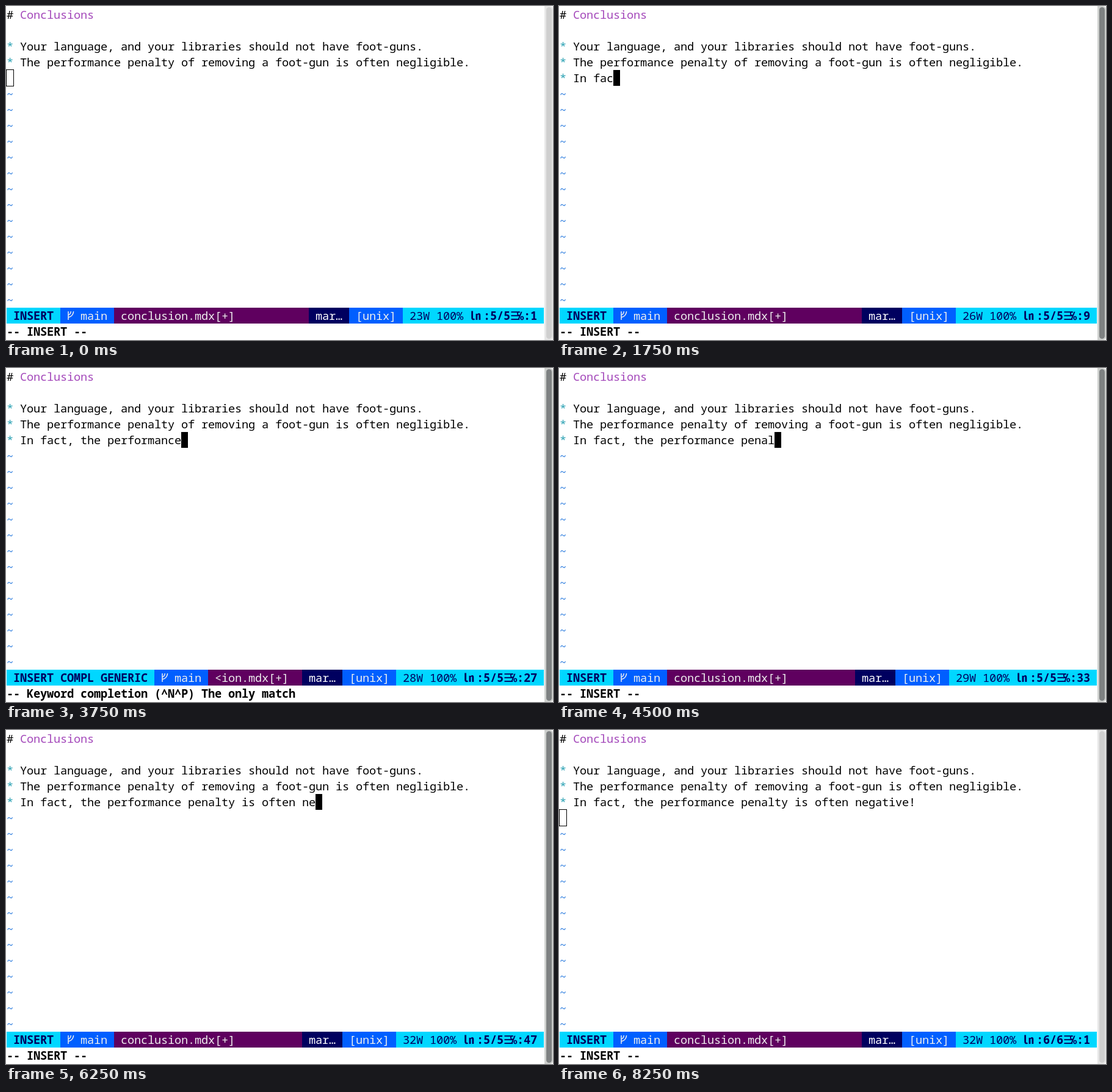
These frames come from a looping animation (896 px wide and 548 px high, 8.5 s). An HTML page:

```html
<!DOCTYPE html>
<html lang="en">
<head>
<meta charset="utf-8">
<title>Conclusions</title>
<style>
  html, body { margin: 0; width: 100%; height: 100%; overflow: hidden; background: #fff; }
  svg { display: block; width: 896px; height: 548px; }
  text {
    font: 18.667px 'Noto Sans Mono', 'DejaVu Sans', 'Noto Sans CJK JP', 'Noto Sans CJK SC', monospace;
    font-variant-ligatures: none;
    white-space: pre;
  }
  .bold { font-weight: 700; }
</style>
</head>
<body>
<svg viewBox="0 0 896 548"><g id="scrollbar"></g><g id="screen"></g></svg>
<script>
const CELL_W = 11, CELL_H = 26, ORIGIN = 1, BASELINE = 20, COLS = 80;
const STEP = 250, LOOP = 8500;
const EDIT_ROW = 4, STATUS_ROW = 19, MESSAGE_ROW = 20;
const CYAN = '#00d7ff', BLUE = '#005fff', NAVY = '#00005f', PLUM = '#5f005f', PALE = '#eeeeee';

const SENTENCE = '* In fact, the performance penalty is often negative!';
const COMPLETED = SENTENCE.indexOf(' penalty');
// Characters on the line after each step; past the end means Enter was pressed.
const ENTER = SENTENCE.length + 1;
const TYPED = [0, 0, 1, 2, 3, 4, 6, 8, 9, 11, 13, 15, 17, 18, 19, COMPLETED,
  28, 30, 32, 34, 36, 38, 40, 42, 44, 46, 48, 50, 51, 52, 53, ENTER, ENTER, ENTER];
const LATE_CURSOR_STEP = 10;

const screen = document.getElementById('screen');
const scrollbar = document.getElementById('scrollbar');
const cellX = col => ORIGIN + col * CELL_W;
const cellY = row => ORIGIN + row * CELL_H;

function add(parent, tag, attrs, content) {
  const node = document.createElementNS('http://www.w3.org/2000/svg', tag);
  for (const name in attrs) node.setAttribute(name, attrs[name]);
  if (content) node.textContent = content;
  parent.appendChild(node);
}

function put(col, row, string, fill = '#000', bold = false) {
  const x = [...string].map((_, i) => cellX(col + i)).join(' ');
  add(screen, 'text', { x, y: cellY(row) + BASELINE, fill, class: bold ? 'bold' : '' }, string);
}

function fillCells(col, row, count, fill) {
  add(screen, 'rect', { x: cellX(col), y: cellY(row), width: count * CELL_W, height: CELL_H, fill });
}

function segment(col, count, string, back, fore, bold) {
  fillCells(col, STATUS_ROW, count, back);
  put(col + 1, STATUS_ROW, string, fore, bold);
}

function drawBranch(col) {
  const x = cellX(col), y = cellY(STATUS_ROW);
  add(screen, 'path', {
    d: `M${x + 2} ${y + 6}v14M${x + 2} ${y + 12}q4 -1 4.3 -6M${x + 2} ${y + 16}q8 -2 8.6 -10`,
    fill: 'none', stroke: PALE, 'stroke-width': 1.5
  });
}

function drawStatus(mode, completing, words, line, column) {
  const position = `:${column}`;
  const modeCells = mode.length + 2;
  const infoCol = COLS - 19 - position.length;
  const formatCol = infoCol - 8, typeCol = formatCol - 6;
  const nameCol = modeCells + 8;

  segment(0, modeCells, mode, CYAN, NAVY, true);
  segment(modeCells, 8, '  main', BLUE, PALE);
  drawBranch(modeCells + 1);
  segment(nameCol, typeCol - nameCol, completing ? '<ion.mdx[+]' : 'conclusion.mdx[+]', PLUM, PALE);
  segment(typeCol, 6, 'mar…', NAVY, '#fff');
  segment(formatCol, 8, '[unix]', BLUE, PALE);
  segment(infoCol, COLS - infoCol, `${words}W 100%`, CYAN, NAVY);
  put(infoCol + 10, STATUS_ROW, '㏑', NAVY, true);
  put(infoCol + 12, STATUS_ROW, `:${line}/${line}`, NAVY, true);
  put(infoCol + 16, STATUS_ROW, '☰', NAVY, true);
  put(infoCol + 17, STATUS_ROW, '℅' + position, NAVY, true);
}

function drawScrollbar(focused) {
  scrollbar.replaceChildren();
  add(scrollbar, 'path', { d: 'M882 0H890Q896 0 896 6V542Q896 548 890 548H882Z', fill: focused ? '#ced0ce' : '#e6e6e6' });
  add(scrollbar, 'rect', { x: 885, y: 2, width: 9, height: 544, rx: 4.5, fill: focused ? '#7e8182' : '#cfcfcf' });
}

function drawCursor(col, row, focused, under) {
  if (focused) {
    fillCells(col, row, 1, '#000');
    if (under) put(col, row, under, '#fff');
  } else {
    add(screen, 'rect', {
      x: cellX(col) - .5, y: cellY(row) - .5, width: CELL_W + 1, height: CELL_H + 1,
      fill: 'none', stroke: '#000'
    });
  }
}

function bullet(row, string) {
  put(0, row, '*', '#2aa1b3');
  if (string) put(2, row, string);
}

function render(step) {
  const focused = step > 0 && step < TYPED.length - 1;
  const entered = TYPED[step] === ENTER;
  const text = SENTENCE.slice(0, TYPED[step]);
  const cursorRow = EDIT_ROW + entered;
  const cursorCol = entered ? 0 : text.length - (step === LATE_CURSOR_STEP);
  const completing = text.length === COMPLETED;
  const words = 23 + text.split(' ').filter(Boolean).length;

  drawScrollbar(focused);
  screen.replaceChildren();
  put(0, 0, '#');
  put(2, 0, 'Conclusions', '#a347ba');
  bullet(2, 'Your language, and your libraries should not have foot-guns.');
  bullet(3, 'The performance penalty of removing a foot-gun is often negligible.');
  if (text) bullet(EDIT_ROW, text.slice(2));
  for (let row = cursorRow + 1; row < STATUS_ROW; row++) put(0, row, '~', '#2a7bde');
  drawCursor(cursorCol, cursorRow, focused, entered ? '' : text[cursorCol]);

  drawStatus(completing ? 'INSERT COMPL GENERIC' : 'INSERT', completing, words, cursorRow + 1, cursorCol + 1);
  put(0, MESSAGE_ROW, completing ? '-- Keyword completion (^N^P) The only match' : '-- INSERT --', '#000', true);
}

let shown = -1;
const start = performance.now();
function tick() {
  const step = Math.floor(((performance.now() - start) % LOOP) / STEP);
  if (step !== shown) render(shown = step);
  requestAnimationFrame(tick);
}
tick();
</script>
</body>
</html>
```
